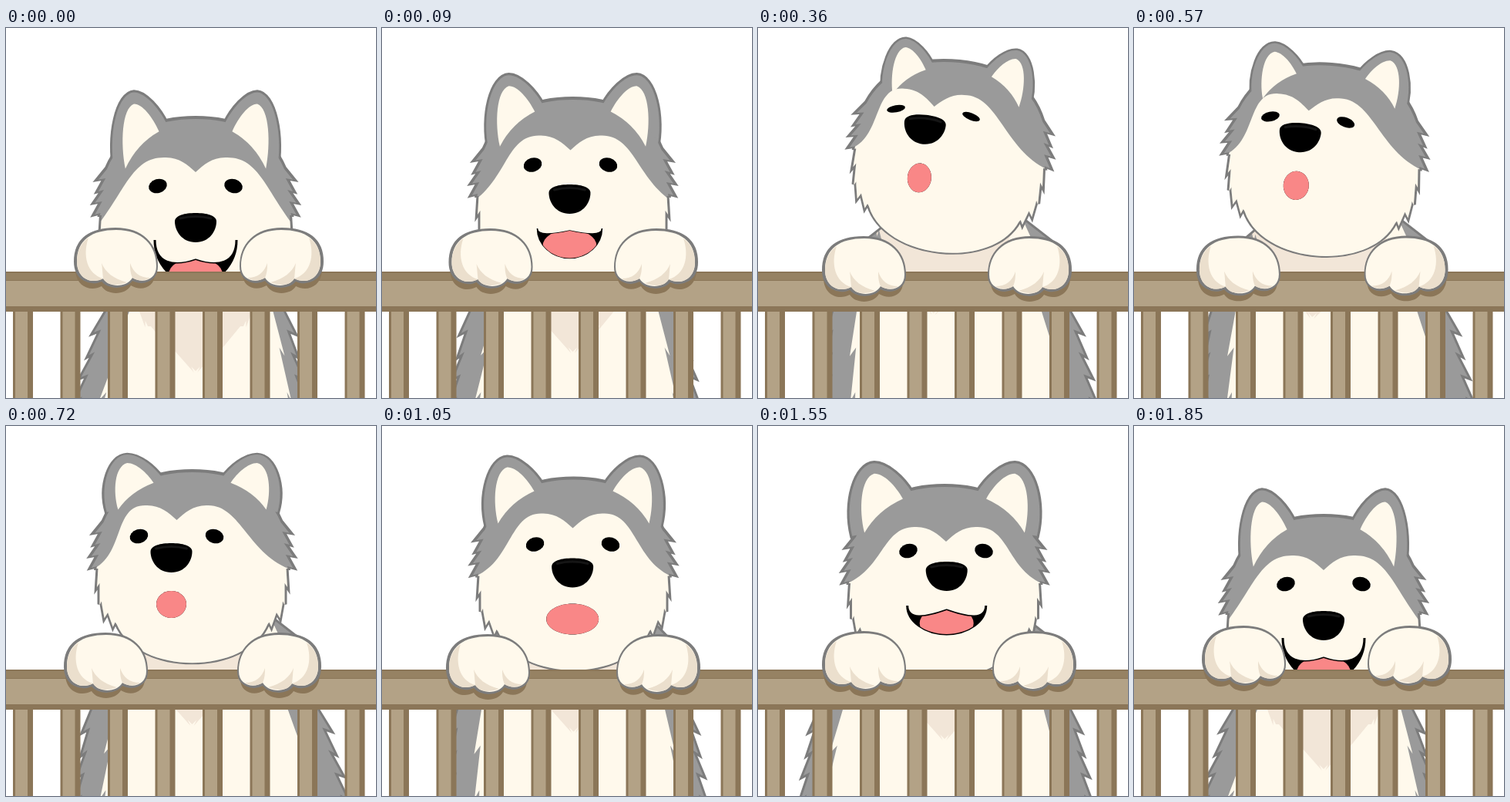
Animation of 480 by 480 pixels, one loop 1950 ms. Source, as an HTML page:

```html
<!DOCTYPE html>
<html lang="en">
<head>
<meta charset="utf-8">
<title>Husky at the fence</title>
<style>
html, body { margin: 0; width: 100%; height: 100%; overflow: hidden; background: #fff; }
svg { display: block; width: 100vw; height: 100vh; }
.fur { fill: #9a9a9a; }
.edge { fill: #7c7c7c; stroke: #7c7c7c; stroke-width: 6; }
.cream { fill: #fff9ec; }
.shade { fill: #ebdfcd; }
.soft { fill: #f2e6d8; }
.tongue { fill: #f98787; }
.wood { fill: #b3a286; }
.dark { fill: #8b7658; }
</style>
</head>
<body>
<svg viewBox="0 0 480 480">
  <defs>
    <path id="skull"/>
    <path id="body"/>
    <path id="mouth"/>
    <g id="ears">
      <path id="ear" d="M40 0C50-17 70-36 86-36C110-35 123 14 113 54L40 40Z"/>
      <use href="#ear" transform="scale(-1 1)"/>
    </g>
    <g id="inners">
      <path id="inner" d="M51 8C60-8 74-23 86-23C103-18 105 22 98 50Q82 22 51 8Z"/>
      <use href="#inner" transform="scale(-1 1)"/>
    </g>
    <clipPath id="skullClip"><use href="#skull"/></clipPath>
    <clipPath id="bodyClip"><use href="#body"/></clipPath>
    <clipPath id="mouthClip"><use href="#mouth"/></clipPath>
    <clipPath id="railClip"><path d="M0 316H480V361H0Z"/></clipPath>
    <path id="pad" d="M-51 6C-51-22-32-35 0-35C34-35 52-15 52 12C52 30 34 35 21 27C14 40-10 40-17 28C-32 36-51 28-51 6Z"/>
    <g id="paw">
      <use href="#pad" class="edge" x="-1"/>
      <use href="#pad" class="cream"/>
      <g class="shade">
        <path d="M-36-25C-44-2-38 22-17 28C-32 36-51 28-51 6C-51-8-46-18-36-25Z"/>
        <path d="M-17 28C-18 20-18 14-19 8C-14 20-4 28 14 33C0 38-12 37-17 28Z"/>
        <path d="M21 27C18 20 18 14 18 8C22 20 30 27 44 27C36 32 27 31 21 27Z"/>
      </g>
    </g>
    <g id="bar">
      <path class="dark" d="M0 360H26V480H0Z"/>
      <path class="wood" d="M3 368H19V480H3Z"/>
    </g>
  </defs>

  <use href="#body" class="edge"/>
  <use href="#body" class="fur"/>
  <g clip-path="url(#bodyClip)">
    <path id="chest" class="cream"/>
    <g class="headPos"><path id="neck" class="soft"/></g>
  </g>

  <g class="headPos">
    <use href="#ears" class="edge earSize"/>
    <use href="#skull" class="edge" y="-1"/>
    <use href="#ears" class="fur earSize"/>
    <use href="#skull" class="fur"/>
    <g clip-path="url(#skullClip)"><path id="mask" class="cream"/></g>
    <use href="#inners" class="cream earSize"/>
    <circle id="eyeL" r="1"/>
    <circle id="eyeR" r="1"/>
    <g id="muzzle">
      <use id="lips" href="#mouth" stroke="#000"/>
      <g clip-path="url(#mouthClip)"><ellipse class="tongue" cy="61" rx="35" ry="22"/></g>
      <path d="M-27-8C-27-16-14-19 0-19C14-19 27-16 27-8C27 4 18 19 0 19C-18 19-27 4-27-8Z"/>
      <path d="M-20-12Q0-17 20-12" fill="none" stroke="#151515" stroke-width="3" stroke-linecap="round"/>
    </g>
  </g>

  <g id="bars"></g>
  <path class="dark" d="M0 316H480V368H0Z"/>
  <path fill="#968263" d="M0 318H480V327H0Z"/>
  <path class="wood" d="M0 328H480V361H0Z"/>
  <g clip-path="url(#railClip)">
    <g class="pawL"><use href="#pad" class="dark" x="-2" y="10"/></g>
    <g class="pawR"><use href="#pad" class="dark" x="-2" y="10"/></g>
  </g>
  <use href="#paw" class="pawL"/>
  <use href="#paw" class="pawR"/>
</svg>
<script>
const LOOP = 1950;

// x, y, tilt: head; ears: scale; turn: face sideways; brow, eye, nose: heights in the head
// mouth: half width, corner, lip, bottom; body: left and right edge at rail and floor; paws: x, x, y
const poses = {
  rest: { x: 246, y: 125, tilt: 0, ears: [.93, 1.15], turn: 0, brow: 43, eye: 80, nose: 134,
    mouth: [53, 16, 42, 73], body: [130, 97, 360, 380], paws: [143, 357, 297] },
  rise: { x: 249, y: 75, tilt: 0, ears: [1, 1], turn: -6, brow: 36, eye: 75, nose: 110,
    mouth: [31, 60, 40, 80], body: [101, 96, 404, 424], paws: [140, 353, 299] },
  howl: { x: 261, y: 52, tilt: 6, ears: [.84, .85], turn: -27, brow: 34, eye: 61, nose: 84,
    mouth: [15.5, 63, 44, 82], body: [98, 96, 404, 430], paws: [138, 352, 308] },
  sway: { x: 241.5, y: 67, tilt: 0, ears: [.98, .83], turn: -20, brow: 36, eye: 76, nose: 104,
    mouth: [19.5, 60, 43, 78], body: [112, 98, 404, 435], paws: [130, 354, 306] },
  settle: { x: 248.5, y: 76.5, tilt: 0, ears: [1, 1], turn: -1, brow: 37, eye: 77, nose: 114,
    mouth: [34, 60, 40, 80], body: [99, 96, 395, 412], paws: [138, 358, 308] },
  smile: { x: 242, y: 86, tilt: 0, ears: [1.06, 1.05], turn: 2, brow: 45, eye: 76, nose: 109,
    mouth: [51, 38, 44, 75], body: [80, 62, 404, 424], paws: [138, 358, 304] }
};

const linear = u => u;
const easeOut = u => Math.sin(u * Math.PI / 2);
const easeIn = u => u ** 2.5;
const moves = [
  { at: 0, from: "rest", to: "rise", ease: linear },
  { at: 180, from: "rise", to: "howl", ease: easeOut },
  { at: 360, from: "howl", to: "sway", ease: easeIn },
  { at: 720, from: "sway", to: "settle", ease: linear },
  { at: 1050, from: "settle", to: "smile", ease: linear, hop: 10 },
  { at: 1550, from: "smile", to: "rest", ease: linear },
  { at: 1850, from: "rest", to: "rest", ease: linear },
  { at: LOOP }
];

const $ = id => document.getElementById(id);
const set = (id, d) => $(id).setAttribute("d", d);
const move = (el, value) => el.setAttribute("transform", value);
const moveAll = (name, value) => document.querySelectorAll("." + name).forEach(el => move(el, value));
const clamp = (v, a, b) => Math.min(b, Math.max(a, v));
const line = pts => pts.map(p => p.join()).join(" ");
const mirror = pts => pts.map(([x, y]) => [-x, y]).reverse();

function blend(a, b, u) {
  if (typeof a === "number") return a + (b - a) * u;
  if (Array.isArray(a)) return a.map((v, i) => blend(v, b[i], u));
  return Object.fromEntries(Object.keys(a).map(k => [k, blend(a[k], b[k], u)]));
}

// Tufts pointing down along the line p to q; negative depth points left
function fur(p, q, n, depth) {
  const len = Math.hypot(q[0] - p[0], q[1] - p[1]);
  const nx = (q[1] - p[1]) / len, ny = (p[0] - q[0]) / len;
  const pts = [p];
  for (let i = 1; i <= n; i++) {
    const out = depth * (i % 2 ? 1 : .75);
    const [x, y] = blend(p, q, i / n);
    pts.push([x + nx * out, y + ny * out], blend(p, q, (i - .2) / n));
  }
  return [...pts, q];
}

function buildHead() {
  const cheek = [...fur([115, 58], [124, 118], 4, 9),
    ...fur([122, 118], [117, 165], 2, 4), ...fur([117, 165], [98, 190], 2, 8)];
  set("skull", `M-115,58 C-95,10 -50,-7 0,-7 C50,-7 95,10 115,58 L${line(cheek)} ` +
    `C70,257 -70,257 -98,190 L${line(mirror(cheek))}Z`);
  const ruff = [...fur([95, 190], [62, 262], 2, 5), ...fur([58, 262], [0, 320], 2, 4)];
  set("neck", `M${line(ruff)} ${line(mirror(ruff))}Z`);
}

function drawBody([l0, l1, r0, r1]) {
  const side = (a, b, n, depth) => fur([a, 368], [b, 484], n, depth);
  set("body", `M165,257 L${l0 + 25},290 ${line(side(l0, l1, 4, -8))} ` +
    `${line(side(r0, r1, 4, 9).reverse())} ${r0 - 20},280 348,252Z`);
  const inset = (r1 - 350) * .45;
  set("chest", `M165,262 L${line(side(l0 + 30, l1 + 30, 2, -8))} ` +
    `${line(side(r0 - inset, r1 - inset, 2, 5).reverse())} 360,285 345,252Z`);
}

function drawMask({ turn: t, brow, nose }) {
  const drop = Math.max(0, nose - 115), edge = 121 + drop;
  const half = s => [[134 * s, edge], [(80 + drop * .6) * s + t * .3, 104 - drop * .8],
    [84 * s + t, brow], [41 * s + t, brow], [22 * s + t, brow - 1], [11 * s + t, brow + 9]];
  const l = half(-1), r = half(1).reverse();
  set("mask", `M${l[0]} C${line(l.slice(1, 4))} ${line(l.slice(4))} ${t},${brow + 19} ` +
    `C${line(r.slice(0, 3))} ${line(r.slice(3))} L150,300 -150,300Z`);
}

// An oval when the corners lie below the lip, a grin when they lie above it
function drawMouth([w, corner, lip, bottom]) {
  const grin = clamp((lip - corner) / 6, 0, 1), sag = grin * 10;
  const low = corner + (bottom - corner) * .55, high = corner + (lip - corner) * .55 + sag * 1.6;
  const h = w * .55;
  set("mouth", `M${-w},${corner} C${-w},${low} ${-h},${bottom} 0,${bottom} ` +
    `C${h},${bottom} ${w},${low} ${w},${corner} C${w},${high} ${h},${lip + sag} 0,${lip} ` +
    `C${-h},${lip + sag} ${-w},${high} ${-w},${corner}Z`);
  $("lips").setAttribute("stroke-width", 3 * grin);
}

function draw(t) {
  const k = moves.findLastIndex(m => m.at <= t);
  const { at, from, to, ease, hop = 0 } = moves[k];
  const raw = (t - at) / (moves[k + 1].at - at);
  const p = blend(poses[from], poses[to], ease(raw));
  const y = p.y - hop * Math.sin(Math.PI * raw);

  moveAll("headPos", `translate(${p.x} ${y}) rotate(${p.tilt})`);
  moveAll("earSize", `scale(${p.ears})`);
  const lid = clamp((p.eye - 50) * .42, 4, 9);
  for (const [id, s] of [["eyeL", -1], ["eyeR", 1]]) {
    move($(id), `translate(${49 * s + p.turn} ${p.eye}) rotate(${16 * s}) scale(12 ${lid})`);
  }
  move($("muzzle"), `translate(${p.turn * 1.35} ${p.nose})`);
  drawMask(p);
  drawMouth(p.mouth);
  drawBody(p.body);
  const [left, right, pawY] = p.paws;
  moveAll("pawL", `translate(${left} ${pawY})`);
  moveAll("pawR", `translate(${right} ${pawY}) scale(-1 1)`);
}

// Quick steps first, slower ones after
const step = t => t < 750 ? Math.floor(t / 30) * 30 : 750 + Math.floor((t - 750) / 100) * 100;
let shown = -1;

function tick() {
  const t = step(performance.now() % LOOP);
  if (t !== shown) draw(shown = t);
  requestAnimationFrame(tick);
}

buildHead();
$("bars").innerHTML = Array.from({ length: 8 }, (_, i) =>
  `<use href="#bar" x="${9 + i * 61.5}"/>`).join("");
tick();
</script>
</body>
</html>
```
